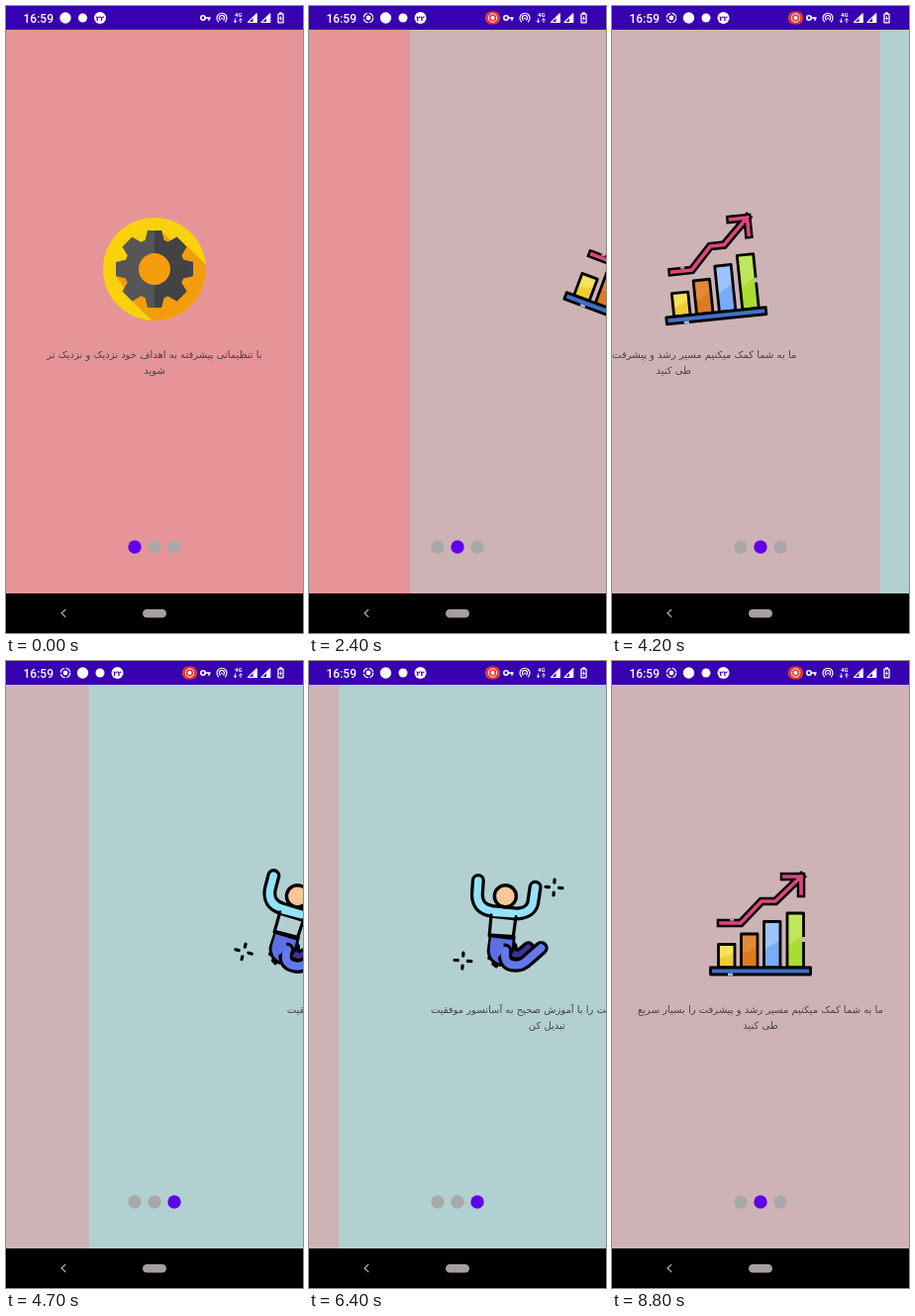
Animation of 300x634 px, one loop 8900 ms. Source, as an HTML page:

```html
<!DOCTYPE html>
<html lang="fa">
<head>
<meta charset="utf-8">
<title>Onboarding</title>
<style>
  html, body { margin: 0; width: 100%; height: 100%; overflow: hidden; background: #000; }
  svg { display: block; width: 300px; height: 634px; }
  .copy { font: 10px "DejaVu Sans", sans-serif; fill: #4b4144; text-anchor: middle; direction: rtl; }
  .clock { font: 500 12px Roboto, sans-serif; fill: #fff; }
  .net { font: 700 6px Roboto, sans-serif; fill: #fff; }
  .date { font: 700 7px "DejaVu Sans", sans-serif; fill: #3700b0; text-anchor: middle; }
  .line { fill: none; stroke-linecap: round; stroke-linejoin: round; }
  .ink { stroke: #000; stroke-width: 2.8; stroke-linejoin: round; }
</style>
</head>
<body>
<svg viewBox="0 0 300 634">
  <defs>
    <clipPath id="disc"><circle r="52"/></clipPath>
    <clipPath id="half"><rect y="-52" width="52" height="104"/></clipPath>
    <clipPath id="view"><rect y="24" width="300" height="570"/></clipPath>
  </defs>
  <g id="pages" clip-path="url(#view)"></g>
  <g id="dots"></g>

  <rect width="300" height="24" fill="#3700b0"/>
  <text class="clock" x="17.5" y="17">16:59</text>
  <g id="notes" fill="#fff">
    <circle cx="77.500" cy="12" r="5.7"/>
    <circle cx="95" cy="12" r="4.500"/>
    <circle cx="112.500" cy="12" r="6"/>
    <text class="date" x="112.500" y="14.500">۲۲</text>
  </g>
  <g id="rec">
    <g fill="none" stroke="#fff">
      <circle cx="60" cy="12" r="4.700" stroke-width="1.200" stroke-dasharray="5.900 1.480"/>
      <circle cx="60" cy="12" r="1.200" stroke-width="2.400"/>
    </g>
    <rect x="178" y="5.500" width="15" height="13" rx="6" fill="#e53935"/>
    <circle cx="185.500" cy="12" r="4.200" fill="none" stroke="#fff"/>
    <circle cx="185.500" cy="12" r="2" fill="#fff"/>
  </g>
  <g class="line" stroke="#fff">
    <circle cx="199" cy="12" r="2.200" stroke-width="1.600"/>
    <path d="M201.500 12H206M205 12.500V14" stroke-width="1.700"/>
    <path d="M214.500 15.800A5 5 0 1 1 221.500 15.800M216.300 14A2.600 2.600 0 1 1 219.700 14" stroke-width="1.200"/>
    <circle cx="218" cy="12.500" r=".6"/>
    <path d="M231.500 13V16.500M230 15.200L231.500 16.700L233 15.200M237 16.700V13M235.500 14.300L237 12.800L238.500 14.300" stroke-width=".9"/>
    <path d="M244.500 16.500H253.300V7.700ZM258 16.500H266.800V7.700Z" stroke-width="1.100"/>
    <path d="M275 8.200H280V16.800H275ZM276.700 7H278.300" stroke-width="1.300"/>
  </g>
  <path d="M249.500 12L253 8.500V16.500H249.500ZM263 12L266.500 8.500V16.500H263ZM278.200 9L276 13H277.300L276.800 16L279 12H277.700Z" fill="#fff"/>
  <text class="net" x="231" y="11">4G</text>

  <rect y="594" width="300" height="40"/>
  <path class="line" d="M59.800 610.500L56 614L59.800 617.500" stroke="#aaa6aa" stroke-width="1.300"/>
  <rect x="138" y="610" width="24" height="8.500" rx="4.250" fill="#a59fa5"/>
</svg>
<script>
const $ = id => document.getElementById(id);
const LOOP = 8900, WIDTH = 300;

// time in ms, pager position
const SCROLL = [[0, 0], [1850, 0], [2050, .1], [2400, .658], [2550, .92], [2700, 1],
  [3800, 1], [4200, 1.097], [4700, 1.72], [5000, 1.963], [5350, 2],
  [5950, 2], [6400, 1.9], [7000, 1.363], [7250, 1.07], [7650, 1], [LOOP, 1]];
// time in ms, selected dot
const SELECTED = [[0, 0], [2300, 1], [4700, 2], [6800, 1]];

function gearPath() {
  const pts = [];
  for (let k = 0; k < 8; k++) {
    const a = k * Math.PI / 4, c = Math.cos(a), s = Math.sin(a);
    for (const [r, w] of [[27, -10], [39, -7], [39, 7], [27, 10]])
      pts.push((r * c - w * s).toFixed(1) + ' ' + (r * s + w * c).toFixed(1));
  }
  return 'M' + pts.join('L') + 'Z';
}

function gear() {
  const shape = fill => `<g fill="${fill}"><path d="${gearPath()}"/><circle r="30.500"/></g>`;
  return `<circle r="52" fill="#f9d20c"/>
    <path clip-path="url(#disc)" fill="#f39c0c" d="M7-38L22-24L33-23L90 34L40 94L-23 32L-30 20L-39 7Z"/>
    ${shape('#575656')}<g clip-path="url(#half)">${shape('#434244')}</g>
    <circle r="16" fill="#f59d0c"/>`;
}

function bar(x, y, fill, shade) {
  return `<rect x="${x}" y="${y}" width="16.500" height="${44 - y}" fill="${fill}"/>
    <path d="M${x} ${y + (44 - y) * .62}L${x + 16.5} ${y + (44 - y) * .4}V44H${x}Z" fill="${shade}"/>
    <rect class="ink" x="${x}" y="${y}" width="16.500" height="${44 - y}" fill="none"/>`;
}

function chart() {
  const arrow = 'M-40-1H-20L1-23H15L41-48M24-48H41V-31';
  return bar(-42.5, 20.5, '#f7e05a', '#efcb35') + bar(-19.5, 10, '#e08a36', '#de7a20') +
    bar(3.5, -2.5, '#9cc4fb', '#7aabf4') + bar(27, -11, '#bfe75a', '#a9dd2f') +
    `<rect class="ink" x="-50.500" y="44" width="101" height="7" fill="#426fc6"/>
    <path d="M43.500 13V18" stroke="#cdb3b5" stroke-width="3"/>
    <path d="M-33 51H-28" stroke="#a9b6d8" stroke-width="2.800"/>
    <path class="line" d="${arrow}" stroke="#000" stroke-width="8.500" style="stroke-linecap:square;stroke-linejoin:miter"/>
    <path class="line" d="${arrow}" stroke="#dc477f" stroke-width="3.700" style="stroke-linecap:square;stroke-linejoin:miter"/>
    <path d="M-31-4.500H-27" stroke="#dc8fa6" stroke-width="2.500"/>`;
}

function limb(d, fill, w) {
  return `<path class="line" d="${d}" stroke="#000" stroke-width="${w + 6.5}"/>
    <path class="line" d="${d}" stroke="${fill}" stroke-width="${w}"/>`;
}

function spark(x, y) {
  return `<path class="line" transform="translate(${x} ${y})" stroke="#000" stroke-width="3.200"
    d="M0-8V-5M0 5V8M-8.500 0H-5M5 0H8.500"/>`;
}

function jumper() {
  return `<g transform="rotate(-2.200)">
    ${limb('M5 23Q6 33 15 29L22 22', '#3f3195', 6)}
    <path class="ink" d="M-17 12H7V26L-5 42Q-17 39-18 28Z" fill="#5c70e6"/>
    ${limb('M-1 27Q-2 42 10 41Q17 41 23 34L35 22', '#6478ec', 8)}
    <path d="M-16 14H-3V26L-7 34Q-16 31-16.500 24Z" fill="#5c70e6"/>
    <path class="line" d="M-16.500 35.500H-16M-12 41L-9 43" stroke="#000" stroke-width="4"/>
    ${limb('M-33-42L-33-28Q-32-13-17-12L8-11Q24-13 24-26L25-39', '#94e2fa', 7.5)}
    <path class="line" d="M-17.500-8L-18 13L6 14L7.500-8" fill="#94e2fa" stroke="#000" stroke-width="3.200"/>
    <path d="M-16-14H6V-7H-16Z" fill="#94e2fa"/>
    <circle cx="-4.500" cy="-28" r="11" fill="#f7c795" stroke="#000" stroke-width="3.400"/>
    ${spark(44, -40)}${spark(-43, 40)}</g>`;
}

const PAGES = [
  ['#e59597', gear, 'با تنظیماتی پیشرفته به اهداف خود نزدیک و نزدیک تر', 'شوید'],
  ['#cdb3b5', chart, 'ما به شما کمک میکنیم مسیر رشد و پیشرفت را بسیار سریع', 'طی کنید'],
  ['#b2d0d2', jumper, 'پله های موفقیت را با آموزش صحیح به آسانسور موفقیت', 'تبدیل کن']
];

$('pages').innerHTML = PAGES.map(([color, art, first, second]) => `<g>
  <rect y="24" width="301" height="570" fill="${color}"/>
  <g>${art()}</g>
  <g class="copy"><text x="150" y="356">${first}</text><text x="150" y="372">${second}</text></g>
</g>`).join('');
$('dots').innerHTML = PAGES.map((_, i) => `<circle cx="${130 + 20 * i}" cy="547" r="6.700"/>`).join('');

const pages = [...$('pages').children], dots = [...$('dots').children];

const rise = i => (SCROLL[i + 1][1] - SCROLL[i][1]) / (SCROLL[i + 1][0] - SCROLL[i][0]);

// slope that keeps the curve monotone
function slope(i) {
  if (i < 1 || i > SCROLL.length - 2) return 0;
  const a = rise(i - 1), b = rise(i);
  return a * b > 0 ? 2 * a * b / (a + b) : 0;
}

function position(t) {
  let i = 0;
  while (i < SCROLL.length - 2 && t >= SCROLL[i + 1][0]) i++;
  const [t0, p0] = SCROLL[i], [t1, p1] = SCROLL[i + 1];
  const h = t1 - t0, u = (t - t0) / h, v = 1 - u;
  return p0 * (1 + 2 * u) * v * v + p1 * u * u * (3 - 2 * u) +
    h * u * v * (slope(i) * v - slope(i + 1) * u);
}

function render(t) {
  const p = position(t);
  pages.forEach((page, i) => {
    const d = i - p, [back, art, copy] = page.children;
    page.style.display = Math.abs(d) < 1 ? '' : 'none';
    back.setAttribute('x', d * WIDTH);
    art.setAttribute('transform', `translate(${150 + d * 508} 266) rotate(${d * 60})`);
    copy.setAttribute('transform', `translate(${d * 3 * WIDTH} 0)`);
  });
  const on = SELECTED.filter(s => t >= s[0]).pop()[1];
  dots.forEach((dot, i) => dot.setAttribute('fill', i === on ? '#6000ea' : '#a9a8a9'));
  const recording = t >= 200;
  $('rec').style.display = recording ? '' : 'none';
  $('notes').setAttribute('transform', `translate(${recording ? 0 : -17.5} 0)`);
}

const start = performance.now();
function tick() {
  render((performance.now() - start) % LOOP);
  requestAnimationFrame(tick);
}
tick();
</script>
</body>
</html>
```
